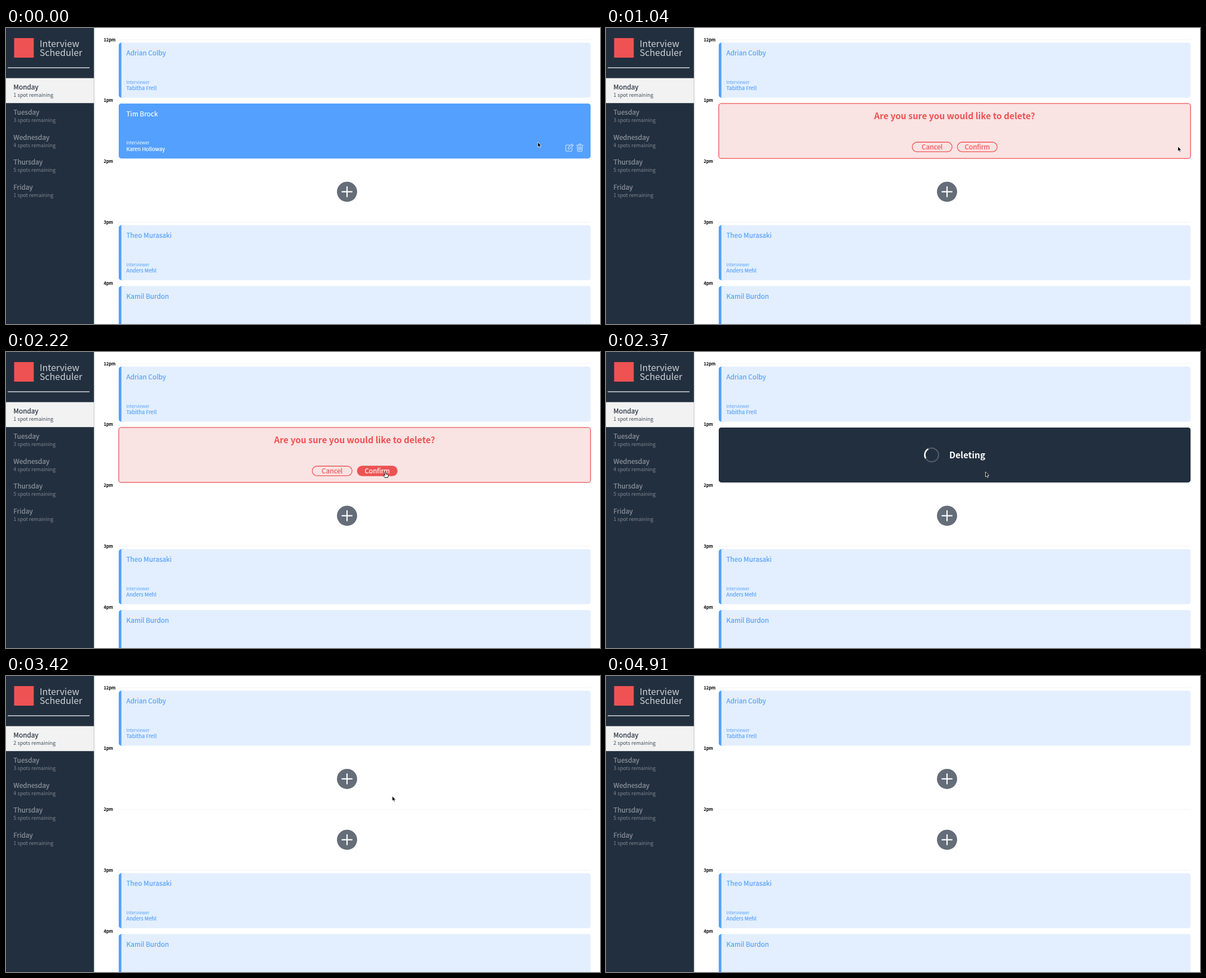
Recreate the animation shown at these times as an HTML page. Size 1059 by 529 pixels, loop 6110 ms.

```html
<!DOCTYPE html>
<html lang="en">
<head>
<meta charset="utf-8">
<title>Interview Scheduler</title>
<style>
  html, body { margin: 0; width: 100%; height: 100%; overflow: hidden; background: #fff; }
  svg { display: block; width: 100%; height: 100%; }
  text {
    font: 11.9px "Noto Sans CJK JP", "Noto Sans CJK SC", "Noto Sans CJK", "Open Sans", sans-serif;
    stroke-width: .2px;
  }
  .light, .label, .brand { font-weight: 300; stroke-width: 0; }
  .light { font-size: 9.1px; opacity: .85; }
  .label { font-size: 7.75px; }
  .name { font-size: 9.4px; }
  .hour, .heading { font-weight: 700; stroke-width: 0; }
  .hour { font-size: 7.6px; }
  .heading { font-size: 15.5px; }
  .brand { font-size: 16.1px; }
  .line { fill: none; stroke: #fff; stroke-linecap: round; stroke-linejoin: round; }
</style>
</head>
<body>
<svg id="stage" viewBox="0 0 1059 529"></svg>
<script>
const LOOP = 6110, TICK = 148.5, PITCH = 108.75;
const NAVY = '#222f3e', BLUE = '#54a0ff', RED = '#ee5253', SLATE = '#646d78';

// Ticks at which the screen changes
const ASK = 7, DELETING = 16, EMPTY = 23, CURSOR_GONE = 33;

// Pointer tip: tick, x, y
const pointerKeys = [
  [0, 948, 204], [6, 1020.5, 211], [7, 1019.5, 211.5], [15, 676.5, 214],
  [22, 676.5, 214], [23, 688.5, 214.5], [27, 611, 186], [28, 611, 186], [32, 987, 255]
];

const text = (x, y, content, color, cls = '', extra = '') =>
  `<text x="${x}" y="${y}" fill="${color}" stroke="${color}" class="${cls}" ${extra}>${content}</text>`;
const rect = (x, y, w, h, fill, extra = '') =>
  `<rect x="${x}" y="${y}" width="${w}" height="${h}" fill="${fill}" ${extra}/>`;

const slotTop = slot => 26.2 + slot * PITCH;

const details = (slot, student, interviewer, color) => {
  const y = slotTop(slot);
  return text(214.5, y + 22.6, student, color) +
    text(214.5, y + 73.4, 'Interviewer', color, 'label') +
    text(214.5, y + 84.9, interviewer, color, 'name');
};

const card = (slot, student, interviewer) => {
  const y = slotTop(slot);
  return rect(201, y, 12, 98.2, BLUE, 'rx="4.5"') +
    `<path fill="#e3effe" d="M205.7 ${y}H1037.7q4.5 0 4.5 4.5v89.2q0 4.5 -4.5 4.5H205.7z"/>` +
    details(slot, student, interviewer, BLUE);
};

const panel = (fill, extra = '') => rect(201, slotTop(1), 841.2, 98.2, fill, `rx="4.5" ${extra}`);

const divider = (slot, id = '') => rect(201, 20.2 + slot * PITCH, 841, 1, '#f3f3f3', id);

const addButton = (slot, id = '') => {
  const y = 75.2 + slot * PITCH;
  return `<circle cx="608" cy="${y}" r="18" fill="${SLATE}" ${id}/>
    <path class="line" stroke-width="2.2" d="M599.2 ${y}h17.6m-8.8 -8.8v17.6"/>`;
};

const button = (x, label, id) => `<g id="${id}">
  ${rect(x, 204, 71, 17.2, 'none', `rx="8.6" stroke="${RED}" stroke-width="1.3"`)}
  ${text(x + 35.5, 216.8, label, RED, '', 'text-anchor="middle"')}</g>`;

const days = ['Monday', 'Tuesday', 'Wednesday', 'Thursday', 'Friday'];
const spots = n => `${n} spot${n > 1 ? 's' : ''} remaining`;
const dayItem = (day, i) => {
  const color = i ? '#9097a0' : NAVY, y = i * 44.75;
  return text(13.3, 110.2 + y, day, color) +
    text(13.3, 123.2 + y, spots([1, 3, 4, 5, 1][i]), color, 'light', `id="spots${i}"`);
};

const stage = document.getElementById('stage');
stage.innerHTML = `
  <defs><linearGradient id="shade"><stop stop-opacity=".1"/><stop offset="1" stop-opacity="0"/></linearGradient></defs>
  ${rect(156.8, 0, 3, 529, 'url(#shade)')}
  ${rect(0, 0, 156.8, 529, NAVY)}
  ${rect(14.5, 18, 35, 35, RED)}
  ${text(60, 33.6, 'Interview', '#cdd2d7', 'brand')}
  ${text(60, 49.8, 'Scheduler', '#cdd2d7', 'brand')}
  ${rect(3, 70.4, 146, 1.3, '#f2f2f2')}
  ${rect(0, 89.6, 156.8, 44.6, '#f2f2f2')}
  ${days.map(dayItem).join('')}

  ${['12pm', '1pm', '2pm', '3pm', '4pm'].map((hour, i) =>
    text(174.2, 23.5 + i * PITCH, hour, '#000', 'hour')).join('')}
  ${divider(0)}${divider(3)}${divider(2, 'id="freedDivider"')}
  ${card(0, 'Adrian Colby', 'Tabitha Frell')}
  ${addButton(2)}
  ${card(3, 'Theo Murasaki', 'Anders Mehl')}
  ${card(4, 'Kamil Burdon', 'Dorothy Vance')}

  <g id="booked">
    ${panel(BLUE)}
    ${details(1, 'Tim Brock', 'Karen Holloway', '#fff')}
    <path class="line" stroke-width="1.3" opacity=".6"
      d="M1005 209.2h-5.5q-1.7 0 -1.7 1.7v7.6q0 1.7 1.7 1.7h8q1.7 0 1.7 -1.7v-3.5M1002.6 213.3l6.4 -6.2 2.6 2.5 -6.4 6.2 -3 .5zM1007.4 208.7l2.6 2.5"/>
    <path id="trash" class="line" stroke-width="1.3"
      d="M1017.3 209.4h11.4M1020.7 209.2l1 -2h2.6l1 2M1018.4 209.6l.5 9.9q.1 1.2 1.3 1.2h5.6q1.2 0 1.3 -1.2l.5 -9.9M1020.9 212v6M1023 212v6M1025.1 212v6"/>
  </g>

  <g id="ask">
    ${panel('#fae3e3', `stroke="${RED}" stroke-width="1.3"`)}
    ${text(621.5, 162.8, 'Are you sure you would like to delete?', RED, 'heading', 'text-anchor="middle"')}
    ${button(546, 'Cancel', 'cancel')}
    ${button(626.4, 'Confirm', 'confirm')}
  </g>

  <g id="deleting">
    ${panel(NAVY)}
    <circle cx="580.6" cy="184" r="12.3" fill="none" stroke="#fff" stroke-opacity=".2" stroke-width="2.4"/>
    <path id="spinner" class="line" stroke-width="2.4" style="stroke-linecap:butt" d="M8.7 -8.7A12.3 12.3 0 0 1 8.7 8.7"/>
    ${text(612, 190, 'Deleting', '#fff', 'heading')}
  </g>

  <g id="free">${addButton(1, 'id="freedButton"')}</g>

  <g id="pointer">
    <path id="arrow" fill="#000" stroke="#fff" stroke-width=".8" d="M0 0V9L2.1 7.2 3.5 10.3 5 9.7 3.7 6.7H6.4Z"/>
    <path id="hand" fill="#fff" stroke="#000" stroke-width=".9" stroke-linejoin="round"
      d="M-1 .9Q0 -.5 1 .9V4L4.2 4.8Q5.3 5.2 5.1 7L4.2 10.5H-1.2L-3.7 6.6Q-3.9 5 -2.4 5.6L-1 7Z"/>
  </g>`;

const el = id => document.getElementById(id);
const show = (id, visible) => el(id).style.display = visible ? '' : 'none';

function pointerAt(tick) {
  const next = pointerKeys.findIndex(key => key[0] > tick);
  if (next < 0) return pointerKeys.at(-1).slice(1);
  const [from, x0, y0] = pointerKeys[next - 1], [to, x1, y1] = pointerKeys[next];
  const p = (tick - from) / (to - from), eased = p * p * (3 - 2 * p);
  return [x0 + (x1 - x0) * eased, y0 + (y1 - y0) * eased];
}

function render(time) {
  const tick = Math.floor((time + 9) / TICK);
  const [x, y] = pointerAt(tick);
  const booked = tick < ASK, free = tick >= EMPTY, deleting = tick >= DELETING && !free;
  const asking = !booked && tick < DELETING;

  show('booked', booked);
  show('ask', asking);
  show('deleting', deleting);
  show('free', free);
  show('freedDivider', free);
  el('spots0').textContent = spots(free ? 2 : 1);

  const overTrash = booked && x > 1016;
  const overConfirm = asking && x > 626 && x < 697;
  const overAdd = free && tick < CURSOR_GONE && Math.hypot(x - 608, y - 184) < 18;
  el('trash').style.opacity = overTrash ? 1 : .6;
  el('confirm').firstElementChild.setAttribute('fill', overConfirm ? RED : 'none');
  for (const paint of ['fill', 'stroke'])
    el('confirm').lastElementChild.setAttribute(paint, overConfirm ? '#fff' : RED);
  el('freedButton').setAttribute('fill', overAdd ? NAVY : SLATE);

  const angle = 180 + (tick * TICK - 2330) / 1100 * 360;
  el('spinner').setAttribute('transform', `translate(580.6 184) rotate(${angle})`);

  const pointing = overTrash || overConfirm || overAdd;
  show('pointer', tick < CURSOR_GONE);
  show('hand', pointing);
  show('arrow', !pointing);
  el('pointer').setAttribute('transform', `translate(${x} ${y})`);
}

const start = performance.now();
function loop() {
  render((performance.now() - start) % LOOP);
  requestAnimationFrame(loop);
}
loop();
</script>
</body>
</html>
```
